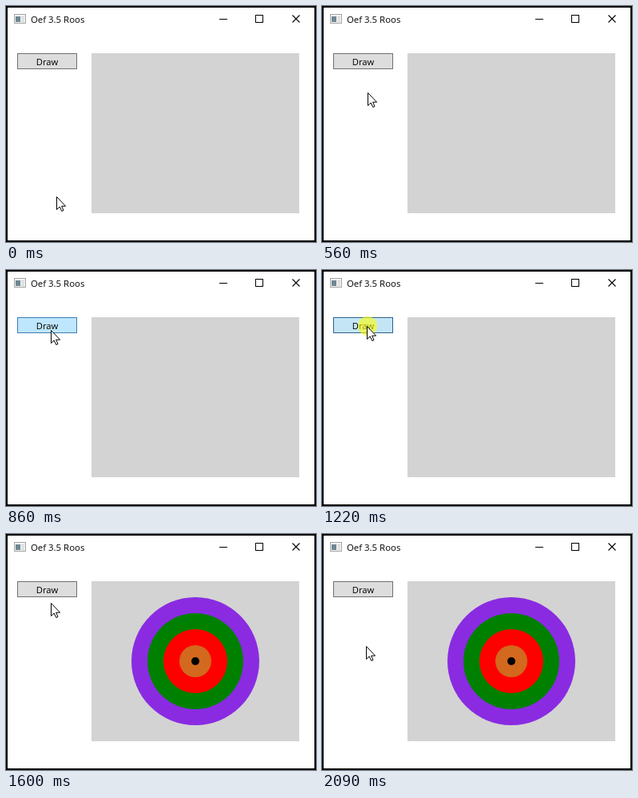
An HTML page for the animation above (3280 ms loop, 388 by 295 pixels).

```html
<!DOCTYPE html>
<html lang="nl">
<head>
<meta charset="utf-8">
<title>Oef 3.5 Roos</title>
<style>
  html, body { margin: 0; width: 100%; height: 100%; overflow: hidden; background: #fff; }
  svg { display: block; width: 388px; height: 295px; font-family: "Open Sans", "Noto Sans", sans-serif; }
  .crisp { shape-rendering: crispEdges; }
  .button, .click, .rings, .cursor { animation: 3280ms step-end infinite; }
  .button { animation-name: button; fill: #ddd; stroke: #707070; }
  .click { animation-name: click; fill: #ff0; fill-opacity: .6; }
  .rings { animation-name: rings; }
  .cursor { animation-name: move; }

  @keyframes button {
    0%, 48.78% { fill: #ddd; stroke: #707070; }
    23.78%, 41.46% { fill: #bee6fd; stroke: #3c7fb1; }
    34.45% { fill: #c4e5f6; stroke: #2c628b; }
  }
  @keyframes click {
    0%, 41.46% { visibility: hidden; }
    34.45% { visibility: visible; }
  }
  @keyframes rings {
    0% { visibility: hidden; }
    41.46%, 100% { visibility: visible; }
  }
  @keyframes move {
    0% { transform: translate(63px, 238px); }
    7.01% { transform: translate(63px, 232px); }
    9.45% { transform: translate(62px, 208px); }
    11.89% { transform: translate(61px, 172px); }
    14.32% { transform: translate(59px, 136px); }
    17.07% { transform: translate(57px, 108px); }
    18.9% { transform: translate(57px, 96px); }
    21.34% { transform: translate(56px, 88px); }
    23.78% { transform: translate(56px, 79px); }
    26.21% { transform: translate(56px, 75px); }
    29.57% { transform: translate(56px, 72px); }
    32.01% { transform: translate(56px, 70px); }
    46.34% { transform: translate(56px, 77px); }
    48.78% { transform: translate(56px, 86px); }
    51.21% { transform: translate(56px, 97px); }
    53.65% { transform: translate(56px, 108px); }
    56.09% { transform: translate(56px, 119px); }
    58.84% { transform: translate(55px, 130px); }
    61.28% { transform: translate(55px, 137px); }
    63.71%, 100% { transform: translate(55px, 140px); }
  }
</style>
</head>
<body>
<svg viewBox="0 0 388 295">
  <rect class="crisp" x="1" y="1" width="386" height="293" fill="#fff" stroke="#000" stroke-width="2"/>

  <!-- title bar -->
  <g class="crisp">
    <rect x="10.5" y="10.5" width="14" height="11" fill="#f4f4f4" stroke="#a5a5a5"/>
    <rect x="12" y="13" width="6" height="7" fill="#6f8791"/>
    <path d="M19 13.5h4M19 15.5h4M19 17.5h4M19 19.5h4" stroke="#d0d0d0"/>
  </g>
  <text x="31" y="21" font-size="11.4">Oef 3.5 Roos</text>
  <g fill="none" stroke="#000">
    <path class="crisp" d="M267 16.5h10M312.5 11.5h9v9h-9z"/>
    <path d="M358.5 11.5l9 9M367.5 11.5l-9 9" stroke-width="1.1"/>
  </g>

  <rect class="button crisp" x="14.5" y="59.5" width="74" height="19"/>
  <text x="51.5" y="74" font-size="11.2" text-anchor="middle">Draw</text>

  <rect x="107" y="59" width="260" height="200" fill="#d3d3d3"/>
  <g class="rings" transform="translate(237 159)">
    <circle r="80" fill="blueviolet"/>
    <circle r="60" fill="green"/>
    <circle r="40" fill="red"/>
    <circle r="20" fill="chocolate"/>
    <circle r="5"/>
  </g>

  <circle class="click" cx="57" cy="70" r="12"/>
  <path class="cursor" d="M.5 .5V16.5L4.2 13L6.8 18.5L9 17.5L6.6 12.2H11.6Z" fill="#fff" stroke="#000"/>
</svg>
</body>
</html>
```
